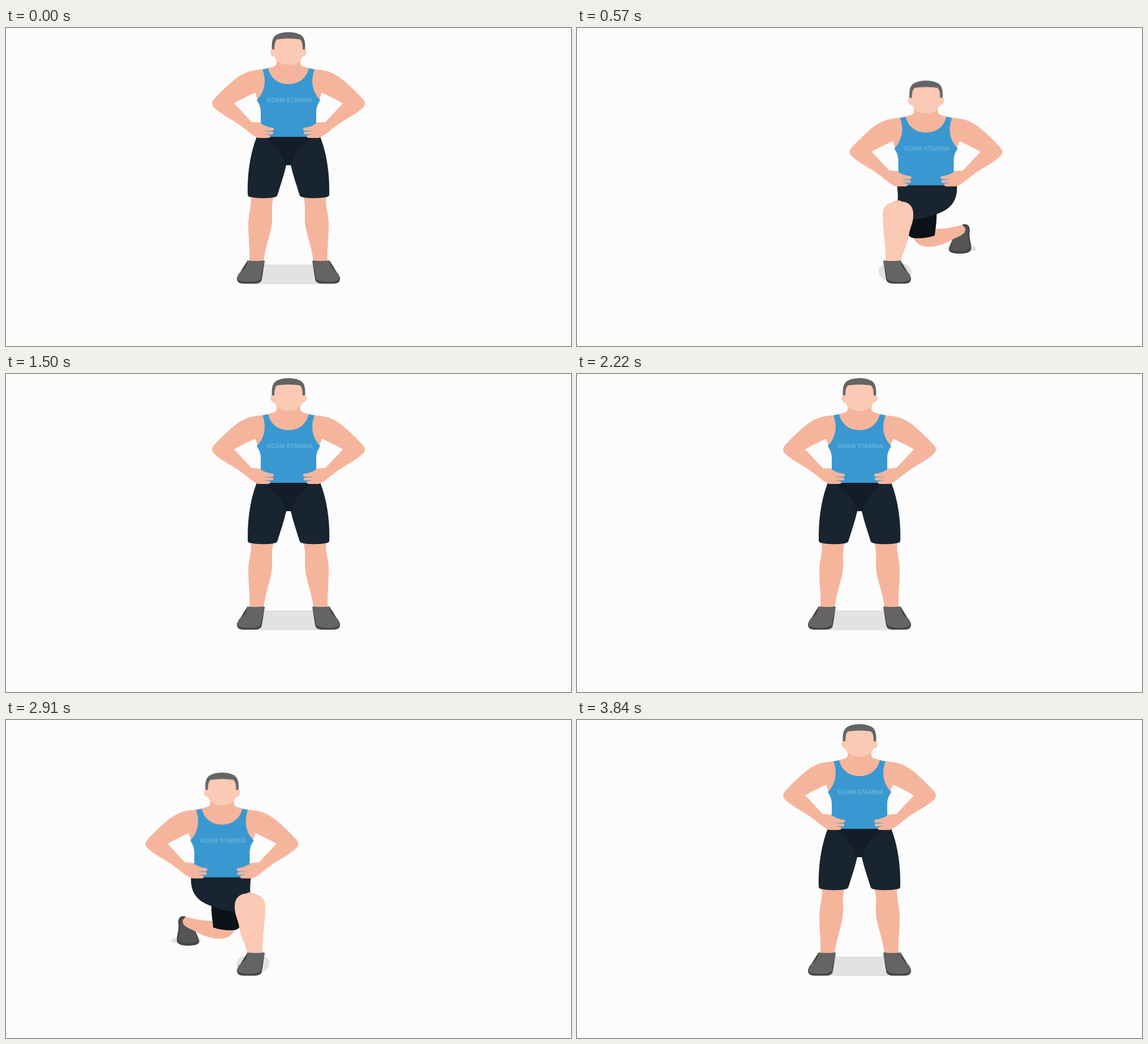
These frames come from a looping animation (998 px wide and 561 px high, 4.56 s). An HTML page without scripts:

```html
<!DOCTYPE html>
<html lang="en">
<head>
<meta charset="utf-8">
<title>Curtsy lunge</title>
<style>
  html, body { margin: 0; width: 100%; height: 100%; overflow: hidden; background: #fcfcfc; }
  svg { display: block; width: 100vw; height: 100vh; }

  .skin { fill: #f5b59c; }
  .light { fill: #fbc9b4; }
  .hair { fill: #646466; }
  .shirt { fill: #3998d0; }
  .shorts { fill: #18242f; }
  .dark { fill: #0c1217; }
  .shoe { fill: #646465; }
  .back { fill: #555557; }
  .sole { fill: #454547; }
  .shadow { fill: #e1e2e2; }
  .label { font: bold 10.4px "Liberation Sans", Arial, sans-serif; fill: #68b1dc; text-anchor: middle; }

  .torso, .legs, .stand, .mid, .low { animation: 4560ms step-end infinite; }
  .torso { animation-name: torso; }
  .legs { animation-name: side; }
  .stand { animation-name: stand; }
  .mid { animation-name: mid; }
  .low { animation-name: low; }

  @keyframes torso {
    0%, 32.8947%, 83.5526%, 100% { transform: translate(0, 0); }
    1.9736%, 22.3684% { transform: translate(58.5px, 49px); }
    11.842% { transform: translate(117.5px, 85.5px); }
    53.2894%, 73.6842% { transform: translate(-58.5px, 49px); }
    63.8157% { transform: translate(-117.5px, 85.5px); }
  }
  /* the second half of the set is the same lunge on the other side */
  @keyframes side {
    0%, 83.5526%, 100% { transform: matrix(1, 0, 0, 1, 0, 0); }
    32.8947% { transform: matrix(-1, 0, 0, 1, 998, 0); }
  }
  @keyframes stand {
    0%, 32.8947%, 83.5526%, 100% { opacity: 1; }
    1.9736%, 53.2894% { opacity: 0; }
  }
  @keyframes mid {
    0%, 11.842%, 32.8947%, 63.8157%, 83.5526%, 100% { opacity: 0; }
    1.9736%, 22.3684%, 53.2894%, 73.6842% { opacity: 1; }
  }
  @keyframes low {
    0%, 22.3684%, 73.6842%, 100% { opacity: 0; }
    11.842%, 63.8157% { opacity: 1; }
  }
</style>
</head>
<body>
<svg viewBox="0 0 998 561" preserveAspectRatio="none">
  <defs>
    <g id="foot">
      <path class="sole" d="M541 411H572L590 440Q591 451 579 451H559Q547 451 546 443Z"/>
      <path class="shoe" d="M542 410Q556 412 572 410C572 420 575 424 582 429C588 433 590 438 589 443Q585 448 569 448Q551 448 547 441C548 430 541 421 542 410Z"/>
    </g>
    <g id="leg">
      <path class="skin" d="M525 297H566C563 314 570 326 570 346C570 370 567 390 568 413H543C541 390 532 368 529 350C526 330 531 315 525 297Z"/>
      <path class="shorts" d="M499 192H555C565 217 572 252 571 294Q571 297 567 298C552 301 534 301 522 298Q519 297 518 293C513 276 507 260 503 242H499Z"/>
      <use href="#foot"/>
    </g>
    <path id="arm" class="skin" d="M500 56H478V62C478 68 471 68 458 72C449 74 444 73 436 75C423 77 411 85 401 93C388 104 376 116 367 126Q361 133 367 140C377 150 393 158 410 169C421 177 428 183 436 189L450 192V167L434 166C424 156 413 143 403 133C414 126 428 120 440 114L446 131H500Z"/>
    <g id="hand">
      <path class="skin" d="M432 166L448 167C455 172 462 175 472 176Q475 179 471 181L459 182L471 183Q474 186 470 188L459 187L467 190Q468 193 463 194H447C440 193 437 189 432 184Z"/>
      <path d="M456 181.8H471M457 187.8H470" fill="none" stroke="#8ba6b4" stroke-width="1"/>
    </g>
    <g id="rear">
      <path class="sole" d="M680 345Q693 341 694 355C691 368 698 380 696 388Q695 396 676 396Q656 396 657 388C658 379 665 373 664 361L684 360V349Z"/>
      <path class="back" d="M683 348Q690 347 690 357C689 370 694 377 693 386Q689 392 676 392Q661 392 660 387C660 378 666 373 665 361L684 360Z"/>
    </g>
    <g id="ground">
      <ellipse class="shadow" cx="680" cy="389" rx="26" ry="6.5"/>
      <path class="shadow" d="M543 416C530 420 529 435 541 443C555 453 594 447 591 428Q587 416 571 415Z"/>
    </g>
  </defs>

  <rect width="998" height="561" fill="#fcfcfc"/>

  <g class="legs">
    <g class="stand">
      <rect class="shadow" x="440" y="417" width="118" height="35"/>
      <use href="#leg"/>
      <use href="#leg" transform="matrix(-1 0 0 1 998 0)"/>
      <path fill="#131d27" d="M457 192H541C529 205 510 214 505 242H493C488 214 469 205 457 192Z"/>
    </g>

    <g class="mid">
      <use href="#ground"/>
      <use href="#rear"/>
      <path class="skin" d="M580 315C619 313 641 328 668 342Q677 346 683 344V360C655 359 618 343 582 338Z"/>
      <path class="dark" d="M502 240H570L555 300L541 323C512 304 498 275 502 240Z"/>
      <path class="dark" d="M585 306L605 309Q603 321 592 329Z"/>
      <path class="shorts" d="M503 240H616C621 264 615 287 606 308L592 321L541 318C543 304 547 294 547 279C530 272 514 260 503 246Z"/>
      <path class="light" d="M541 319C543 302 588 302 592 318C592 328 588 333 588 345C585 370 574 390 572 413H546C546 385 541 366 541 345Z"/>
      <use href="#foot"/>
    </g>

    <g class="low">
      <use href="#ground"/>
      <use href="#rear" transform="translate(0 2)"/>
      <path class="skin" d="M594 368L630 354C648 355 662 352 673 349Q684 346 686 355Q686 363 674 368C658 375 646 384 625 386Q599 387 594 368Z"/>
      <path class="dark" d="M586 332L635 323C636 342 633 354 632 366Q619 371 600 371Q589 371 586 366Z"/>
      <path class="shorts" d="M565 276H671C673 301 663 317 641 326C625 333 609 338 592 338L566 312Q568 295 565 276Z"/>
      <path class="skin" d="M553 312Q557 304 570 304L580 310Z"/>
      <path class="light" d="M540 328C540 311 554 306 571 306C587 306 595 316 594 331C594 345 587 354 586 367C583 385 574 397 572 413H545C546 385 540 360 540 328Z"/>
      <use href="#foot"/>
    </g>
  </g>

  <g class="torso">
    <use href="#arm"/>
    <use href="#arm" transform="matrix(-1 0 0 1 998 0)"/>
    <path class="shirt" d="M453 73L463 71C468 90 482 99 499 99S530 90 535 71L545 73C538 91 540 112 555 127C551 134 548 139 548 148V168L552 192H446L450 168V148C450 139 447 134 443 127C458 112 460 91 453 73Z"/>
    <text class="label" x="501" y="130.5">ROAM STAMINA</text>
    <use href="#hand"/>
    <use href="#hand" transform="matrix(-1 0 0 1 998 0)"/>
    <path class="hair" d="M470 42C468 22 472 14 480 11C490 6 508 6 518 11C526 14 530 22 528 42L499 50Z"/>
    <path class="light" d="M474 38C474 29 475 23 479 20Q499 17 519 20C523 23 524 29 524 38Q531 36 531 43Q530 50 523 51C521 60 511 65 499 65S477 60 475 51Q468 50 467 43Q467 36 474 38Z"/>
  </g>
</svg>
</body>
</html>
```
